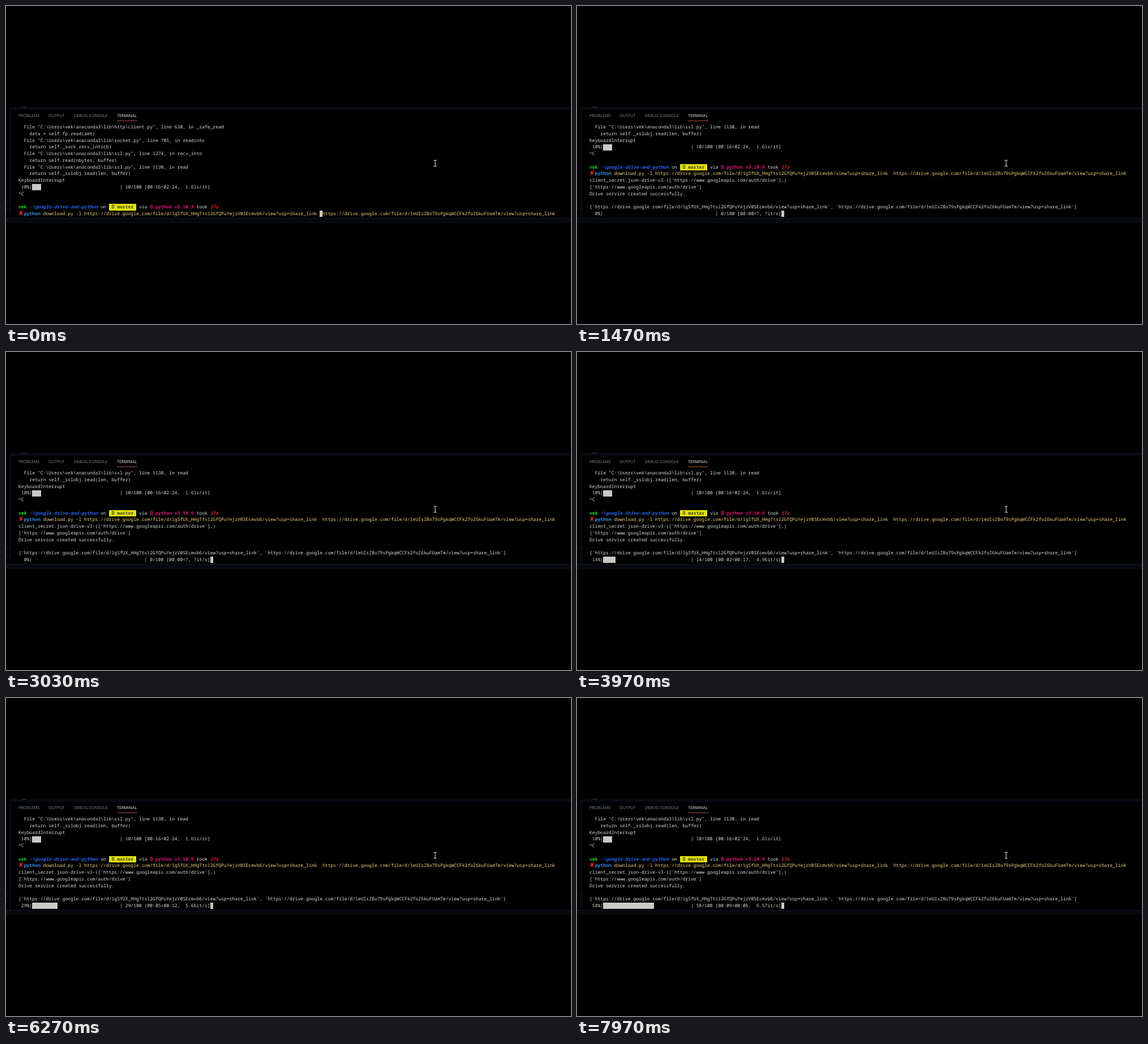
An HTML page that plays this animation: 998x561 px, repeating every 8000 ms.

```html
<!DOCTYPE html>
<html lang="en">
<head>
<meta charset="utf-8">
<title>Terminal download</title>
<style>
  :root { --cell: 4.84px; --row: 11.74px; }
  html, body { margin: 0; width: 100%; height: 100%; overflow: hidden; background: #000; }
  #stage { position: absolute; left: 0; top: 0; width: 998px; height: 561px; overflow: hidden; text-rendering: geometricPrecision; }
  #stage > * { position: absolute; }
  .strip { left: 8px; top: 178px; width: 990px; height: 2px; background: #0b0d10; }
  .crumb { left: 27px; top: 178px; width: 9px; height: 1px; background: #3c3f44; }
  .edge { background: #101c2c; }
  .status { left: 0; top: 374px; width: 998px; height: 9px; background: #07090c; border-top: 1px solid #0e1722; box-sizing: border-box; }
  .tab { top: 188px; font: 7.25px/12px "Open Sans", sans-serif; color: #858b92; white-space: pre; }
  .tab.on { color: #f0f2f4; }
  .underline { left: 196px; top: 202px; width: 36px; height: 1px; background: #a84a3a; }
  #term { left: 22px; top: 208.2px; font: 500 8.075px/11.74px "Noto Sans Mono", monospace; color: #dadada; }
  #term div { position: relative; height: var(--row); white-space: pre; }
  .user, .path, .git, .ver, .took { font-weight: 700; }
  .user { color: #1fdc1f; }
  .path { color: #2563eb; font-style: italic; }
  .git { color: #4a4a10; background: #e2e210; display: inline-block; height: var(--row); vertical-align: top; }
  .ver { color: #e2127a; }
  .took { color: #ea1c24; font-style: italic; }
  .cmd { color: #2f8fe6; font-weight: 600; }
  .arg { color: #f0d47a; }
  .fail { position: absolute; left: 0; top: 0; color: #f02a20; font: 700 10.5px/11.74px "DejaVu Sans", sans-serif; }
  .box { position: relative; }
  .box::after { content: "?"; position: absolute; left: .4px; top: 2px; width: 4px; height: 6px; border: .7px solid; box-sizing: border-box; font: 4px/5px "Noto Sans Mono", monospace; text-align: center; }
  .bar, .caret { position: absolute; top: .6px; height: 11px; background: #c9c9c6; }
  .bar { left: calc(5 * var(--cell)); }
  .caret { width: var(--cell); }
  #mouse { left: 753px; top: 271px; }
</style>
</head>
<body>
<div id="stage">
  <div class="strip"></div>
  <div class="crumb"></div>
  <div class="edge" style="left:7px;top:181px;width:991px;height:1px"></div>
  <div class="edge" style="left:7px;top:181px;width:1px;height:193px"></div>
  <div class="edge" style="left:0;top:345px;width:7px;height:1px"></div>
  <div class="edge" style="left:0;top:358px;width:7px;height:1px"></div>
  <div class="status"></div>
  <div class="tab" style="left:22px">PROBLEMS</div>
  <div class="tab" style="left:75px">OUTPUT</div>
  <div class="tab" style="left:120px">DEBUG CONSOLE</div>
  <div class="tab on" style="left:196px">TERMINAL</div>
  <div class="underline"></div>
  <div id="term"></div>
  <svg id="mouse" width="10" height="13" fill="none" stroke="#d8d8d8" stroke-width="1.1">
    <path d="M2.2 1.3H4.2L5 2L5.8 1.3H7.8M5 2V11M2.2 11.7H4.2L5 11L5.8 11.7H7.8"/>
  </svg>
</div>
<script>
const LOOP = 8000, ROWS = 14, BAR_COLS = 32;
const term = document.getElementById("term");

const span = (cls, text) => `<span class="${cls}">${text}</span>`;
const caret = col => `<i class="caret" style="left:calc(${col} * var(--cell))"></i>`;
const link = id => `https://drive.google.com/file/d/${id}/view?usp=share_link`;
const trace = (file, line, fn) =>
  `  File "C:\\Users\\vek\\anaconda3\\lib\\${file}", line ${line}, in ${fn}`;

function progress(done, timing) {
  const cols = BAR_COLS * done / 100;
  return `${String(done).padStart(3)}%|` +
    `<i class="bar" style="width:calc(${cols} * var(--cell))"></i>` +
    `${" ".repeat(BAR_COLS)}| ${done}/100 [${timing}]`;
}

const first = link("1gSfUX_HHgTts12GfQPuYejzV0SEcmvb6");
const second = link("1eUIsZBo79sPgkqWCCFk2foZ6kuFUamTm");
const box = span("box", " ");

const history = [
  trace("http\\client.py", 630, "_safe_read"),
  "    data = self.fp.read(amt)",
  trace("socket.py", 705, "readinto"),
  "    return self._sock.recv_into(b)",
  trace("ssl.py", 1274, "recv_into"),
  "    return self.read(nbytes, buffer)",
  trace("ssl.py", 1130, "read"),
  "    return self._sslobj.read(len, buffer)",
  "KeyboardInterrupt",
  progress(10, "00:16&lt;02:24,  1.61s/it"),
  "^C",
  "",
  span("user", "vek") + " " + span("path", "~\\google-drive-and-python") + " on " +
    span("git", ` ${box} master `) + " via " + span("ver", `${box} python v3.10.9`) +
    " took " + span("took", "17s"),
  span("fail", "✘") + "  " + span("cmd", "python") + span("arg", ` download.py -l ${first}  ${second}`)
];

const service = [
  "client_secret.json-drive-v3-(['https://www.googleapis.com/auth/drive'],)",
  "['https://www.googleapis.com/auth/drive']",
  "Drive service created successfully.",
  ""
];
const links = `['${first}', '${second}']`;
const download = line => [...history, ...service, links, line + caret(70)];

// [start in ms, lines on the terminal]
const states = [
  [0, [...history.slice(0, -1), history.at(-1) + caret(110)]],
  [470, [...history, caret(0)]],
  [900, [...history, ...service, caret(0)]],
  [1100, download(`  0%|${" ".repeat(41)}| 0/100 [00:00&lt;?, ?it/s]`)],
  [3170, download(progress(14, "00:02&lt;00:17,  4.96it/s"))],
  [4870, download(progress(29, "00:05&lt;00:12,  5.66it/s"))],
  [6400, download(progress(43, "00:07&lt;00:09,  6.17it/s"))],
  [7830, download(progress(58, "00:09&lt;00:06,  6.57it/s"))]
];

let shown = null;
function draw(now) {
  const t = now % LOOP;
  const state = states.findLast(([start]) => start <= t);
  if (state !== shown) {
    shown = state;
    term.innerHTML = state[1].slice(-ROWS).map(line => `<div>${line}</div>`).join("");
  }
}

const begin = performance.now();
function tick() {
  draw(performance.now() - begin);
  requestAnimationFrame(tick);
}
tick();
</script>
</body>
</html>
```
